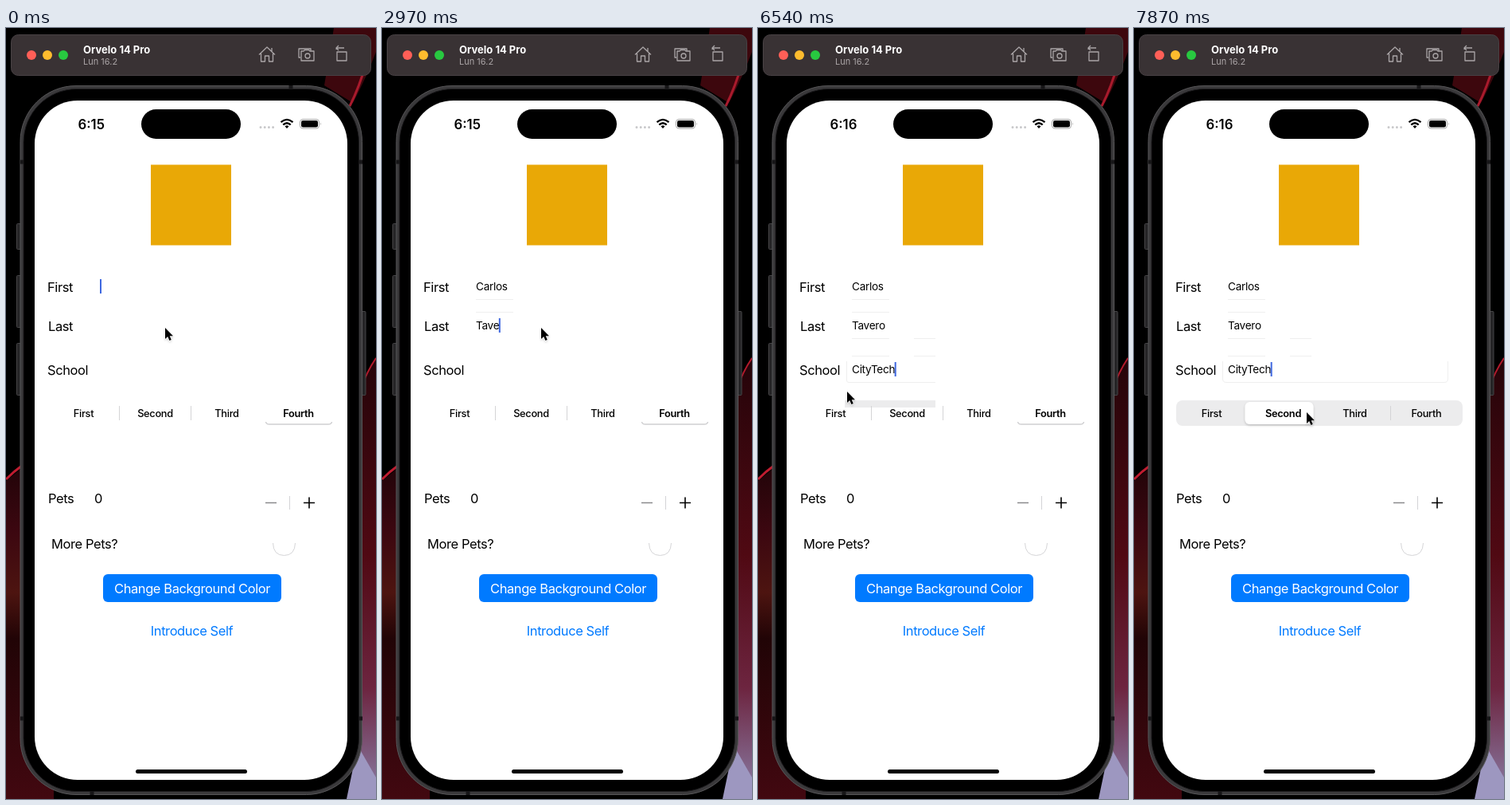
Write an HTML page that moves like this. It is 465 by 967 pixels and loops after 8000 ms.

```html
<!DOCTYPE html>
<html lang="en">
<head>
<meta charset="utf-8">
<title>Form demo</title>
<style>
html, body { margin: 0; width: 100%; height: 100%; overflow: hidden; background: #000; }
svg { display: block; width: 465px; height: 967px; }
text { font-family: Inter, "Liberation Sans", sans-serif; white-space: pre; }
.label { font-size: 16.5px; letter-spacing: -.42px; }
.field { font-size: 13.6px; letter-spacing: -.3px; }
.seg { font-size: 12.8px; letter-spacing: -.3px; font-weight: 500; text-anchor: middle; }
.mid { text-anchor: middle; }
.icon { fill: none; stroke: #aaa5a7; stroke-width: 1.3; stroke-linejoin: round; }
.faint { fill: none; stroke: #efefef; }
.sep { stroke: #d4d4d6; }
</style>
</head>
<body>
<svg viewBox="0 0 465 967">
  <defs>
    <linearGradient id="left" x2="0" y2="1">
      <stop offset="0" stop-color="#180306"/><stop offset=".25" stop-color="#3c0710"/>
      <stop offset=".42" stop-color="#4d1410"/><stop offset=".55" stop-color="#210406"/>
      <stop offset="1" stop-color="#420810"/>
    </linearGradient>
    <linearGradient id="right" x2="0" y2="1">
      <stop offset="0" stop-color="#240409"/><stop offset=".45" stop-color="#500913"/>
      <stop offset=".75" stop-color="#6d2540"/><stop offset="1" stop-color="#8a7fa8"/>
    </linearGradient>
    <filter id="soft" x="-20%" y="-20%" width="140%" height="150%">
      <feDropShadow dx="0" dy="1.5" stdDeviation="1.5" flood-opacity=".2"/>
    </filter>
  </defs>

  <!-- Desktop -->
  <rect width="465" height="967"/>
  <path d="M0 568L60 520V967H0Z" fill="url(#left)"/>
  <path d="M0 566Q10 556 20 549" fill="none" stroke="#c01c30" stroke-width="3"/>
  <path d="M465 412Q450 435 440 470V967H465Z" fill="url(#right)"/>
  <path d="M465 414Q454 430 446 452" fill="none" stroke="#b31a2c" stroke-width="2"/>
  <path d="M428 967L442 900L465 940V967Z" fill="#9d97c0"/>
  <path d="M412 0H465V30Q452 64 436 94L400 72Z" fill="#3d070d"/>
  <path d="M452 46Q444 74 432 98" fill="none" stroke="#a81a2c" stroke-width="3"/>

  <!-- Window bar -->
  <rect x="6.5" y="8.5" width="452" height="51" rx="9" fill="#393234" stroke="#484144"/>
  <circle cx="32" cy="34" r="6" fill="#ff5f57"/>
  <circle cx="52" cy="34" r="6" fill="#febc2e"/>
  <circle cx="72" cy="34" r="6" fill="#28c840"/>
  <text x="97" y="32" font-size="13" font-weight="700" fill="#fff">Orvelo 14 Pro</text>
  <text x="97" y="46" font-size="11" fill="#aaa4a6">Lun 16.2</text>
  <g class="icon">
    <path d="M318 33.5L328 24L338 33.5M320.500 32V42H325.500V35H330.500V42H335.500V32M334 29V25"/>
    <path d="M370 37H368V26H383V29"/>
    <path d="M371 29H374L375.500 27.500H380.500L382 29H387V41H371Z"/><circle cx="379" cy="35" r="3"/>
    <path d="M416 30H428V41H416ZM415 27Q415 25 418 25H425M418 22L415 25L418 28"/>
  </g>

  <!-- Phone -->
  <g fill="#252426" stroke="#454446">
    <rect x="13.5" y="245.500" width="6" height="32" rx="1"/>
    <rect x="13.5" y="310.500" width="6" height="65" rx="1"/>
    <rect x="13.5" y="395.500" width="6" height="65" rx="1"/>
    <rect x="446" y="355.500" width="6" height="105" rx="1"/>
  </g>
  <rect x="18" y="72.500" width="429.500" height="889" rx="70" fill="#3a393b" stroke="#575658"/>
  <rect x="22" y="76.500" width="421.500" height="881" rx="67" stroke="#1c1b1d"/>
  <path d="M18 168H22M443.500 168H448M18 866H22M443.500 866H448M358 72V76M108 957V962" stroke="#171618" stroke-width="5"/>
  <rect x="36" y="91" width="393" height="852" rx="54" fill="#fff"/>
  <rect x="170" y="102" width="125" height="37" rx="18.500"/>
  <rect x="163" y="930" width="140" height="5" rx="2.500"/>
  <text id="clock" x="90.500" y="126.500" font-size="16.800" font-weight="600"></text>
  <path d="M320 124.500H336" stroke="#c9c9cb" stroke-width="3" stroke-linecap="round" stroke-dasharray="0 5.200"/>
  <g fill="none" stroke="#000" stroke-width="2.300">
    <path d="M345.500 118.200Q353 111.500 360.500 118.200M348.300 121.400Q353 117 357.700 121.400"/>
    <path d="M350.500 123.200Q353 121.300 355.500 123.200L353 126Z" fill="#000" stroke="none"/>
  </g>
  <rect x="369.500" y="114.500" width="24" height="11.500" rx="3.500" fill="none" stroke="#a5a5a5"/>
  <rect x="371" y="116" width="21" height="8.500" rx="2.300"/>
  <path d="M395.200 118.500Q397 120.200 395.200 122" fill="#a5a5a5"/>

  <rect x="182" y="171.500" width="101" height="101" fill="#e9a806"/>

  <!-- Form -->
  <g class="label">
    <text x="52" y="331">First</text>
    <text x="53" y="380">Last</text>
    <text x="52" y="435">School</text>
    <text x="53" y="596">Pets</text>
    <text x="111" y="596">0</text>
    <text x="57" y="653">More Pets?</text>
    <rect x="122" y="685" width="224" height="35" rx="6" fill="#007aff"/>
    <text class="mid" x="234" y="709" fill="#fff">Change Background Color</text>
    <text class="mid" x="233.500" y="762" fill="#007aff">Introduce Self</text>
  </g>
  <path d="M326 595.500H340" stroke="#8a8a8c" stroke-width="1.500"/>
  <path d="M356.500 587V604" class="sep"/>
  <path d="M374 595.500H388M381 588.500V602.500" stroke="#000" stroke-width="1.600"/>
  <path d="M335.500 646Q336 661.500 349.500 661.500T363.500 646" fill="none" stroke="#d5d5d7"/>

  <g class="faint">
    <path data-on="1930" d="M118 340.500H165M118 356.500H165"/>
    <path data-on="3570" d="M118 389.500H165M118 411.500H165"/>
    <path data-on="6240" d="M196 389.500H223"/>
    <path data-on="6390" d="M196 411.500H223"/>
    <path data-on="6540" data-off="7130" d="M111.500 418V442Q111.500 444.500 114 444.500H223"/>
    <path data-on="7130" d="M111.500 418V440Q111.500 444.500 116 444.500H390Q394.500 444.500 394.500 440V418"/>
  </g>
  <g fill="#ececed">
    <rect data-on="6540" data-off="7130" x="109" y="467" width="114" height="9"/>
    <rect data-on="6690" data-off="7130" x="109" y="475" width="66" height="24"/>
    <path data-on="7130" data-off="7430" d="M60 467H405Q413 467 413 475V491Q413 499 405 499H60Z"/>
    <rect data-on="7430" x="53" y="467" width="360" height="32" rx="8"/>
  </g>
  <path data-off="7130" d="M326.500 494Q327 497 331 497H405Q409 497 409.500 494" fill="none" stroke="#cfcfd1" stroke-width="1.500"/>
  <path data-off="7130" class="sep" d="M142.500 474V492"/>
  <path data-off="7870" class="sep" d="M232.500 474V492"/>
  <path data-on="7130" class="sep" d="M322.500 474V492"/>
  <rect id="pill" data-on="7130" y="469" width="86" height="28" rx="6" fill="#fff" filter="url(#soft)"/>
  <g id="segs"></g>
  <g id="fields"></g>
  <rect id="caret" width="2" height="18" fill="#3f68e0"/>
  <path id="pointer" d="M0 0V14L3.200 11L5.400 16L7.800 15L5.700 10.200H10Z" stroke="#fff" stroke-width="1" paint-order="stroke" filter="url(#soft)"/>
</svg>
<script>
const LOOP = 8000;
const $ = id => document.getElementById(id);

// Last row whose start time has passed
const at = (rows, t) => rows.filter(r => r[0] <= t).pop();

function addText(parent, cls, x, y, content) {
  const el = document.createElementNS("http://www.w3.org/2000/svg", "text");
  el.setAttribute("class", cls);
  el.setAttribute("x", x);
  el.setAttribute("y", y);
  el.textContent = content;
  return $(parent).appendChild(el);
}

// Each key row: time, number of letters typed
const fields = [
  { word: "Carlos", y: 329, focus: 0,
    keys: [[0, 0], [300, 1], [600, 2], [750, 3], [1040, 4], [1190, 5], [1630, 6]] },
  { word: "Tavero", y: 378, focus: 1930,
    keys: [[0, 0], [2380, 1], [2680, 2], [2830, 3], [2970, 4], [3120, 6]] },
  { word: "CityTech", y: 433, focus: 3570,
    keys: [[0, 0], [4160, 1], [4460, 2], [4600, 3], [4750, 4], [5200, 6], [5500, 7], [5640, 8]] }
];
for (const f of fields) f.el = addText("fields", "field", 118, f.y, "");

const segs = ["First", "Second", "Third", "Fourth"]
  .map((name, i) => addText("segs", "seg", 97.5 + 90 * i, 487.5, name));

// Time, x, y
const pointerPath = [
  [0, 200, 376], [6240, 208, 393], [6390, 208, 416], [6540, 112, 456],
  [6690, 160, 480], [6830, 126, 482], [6980, 106, 484], [7130, 114, 485],
  [7280, 157, 485], [7430, 188, 486], [7580, 210, 484], [7720, 217, 482]
];
const pillPath = [[0, 325], [7130, 172], [7280, 62.5], [7430, 55], [7870, 139.5]];
const selected = [[0, 3], [7130, 0], [7870, 1]];
const timed = [...document.querySelectorAll("[data-on], [data-off]")];

function show(el, on) {
  el.style.display = on ? "" : "none";
}

function draw(t) {
  $("clock").textContent = t < 3710 ? "6:15" : "6:16";
  for (const el of timed)
    show(el, t >= (el.dataset.on || 0) && t < (el.dataset.off || LOOP));

  for (const f of fields) f.el.textContent = f.word.slice(0, at(f.keys, t)[1]);
  const active = fields.filter(f => f.focus <= t).pop();
  const typed = active.el.textContent ? active.el.getComputedTextLength() - 0.5 : 0;
  $("caret").setAttribute("x", 118 + typed);
  $("caret").setAttribute("y", active.y - 14);
  show($("caret"), t < 7130 || t >= 7580);

  $("pill").setAttribute("x", at(pillPath, t)[1]);
  segs.forEach((el, i) => el.style.fontWeight = i === at(selected, t)[1] ? 600 : 500);
  const [, x, y] = at(pointerPath, t);
  $("pointer").setAttribute("transform", `translate(${x} ${y})`);
}

const start = performance.now();
function tick() {
  draw((performance.now() - start) % LOOP);
  requestAnimationFrame(tick);
}
tick();
</script>
</body>
</html>
```
